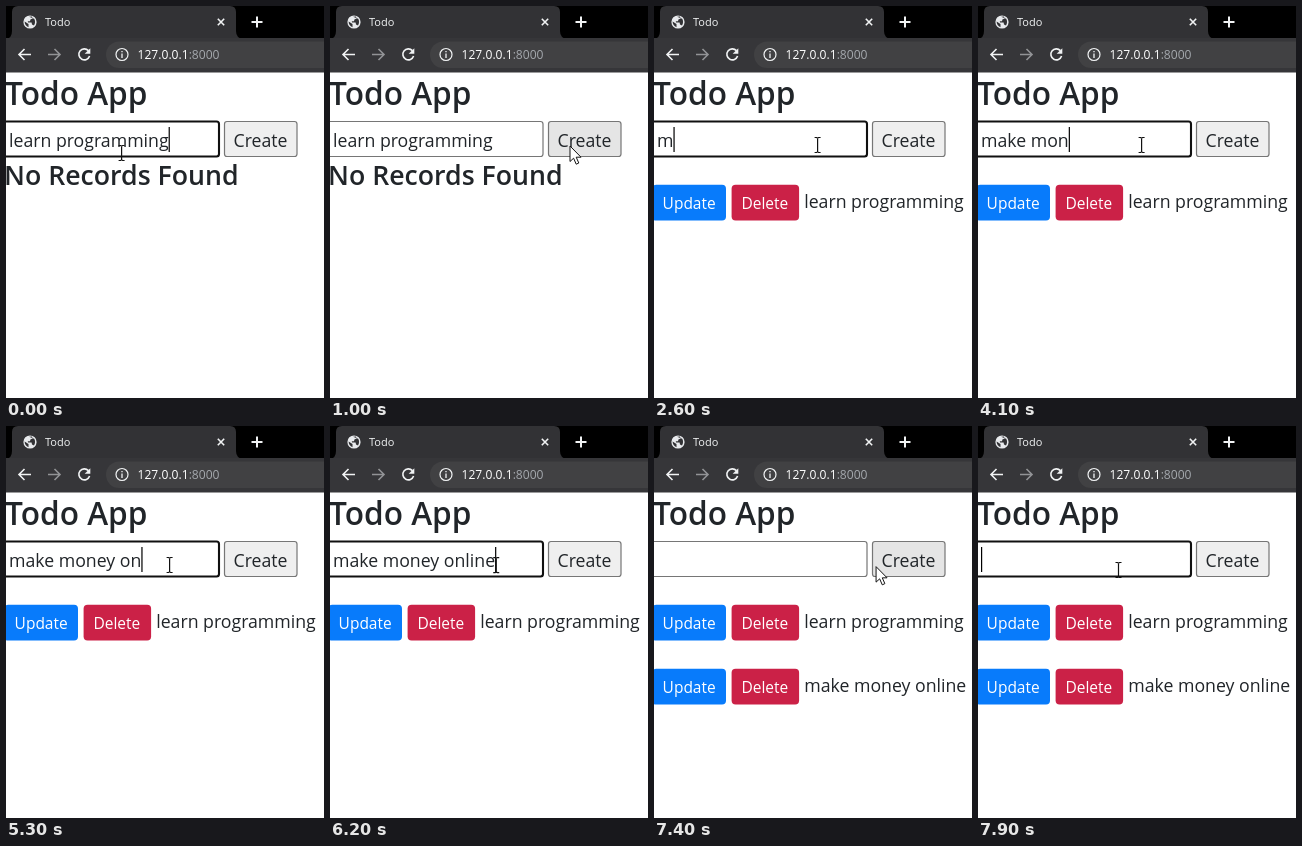
An HTML page for the animation above (8 s loop, 318 by 392 pixels).

```html
<!DOCTYPE html>
<html lang="en">
<head>
<meta charset="utf-8">
<title>Todo</title>
<style>
  html, body { margin: 0; width: 100%; height: 100%; overflow: hidden; background: #fff; }
  svg { display: block; width: 318px; height: 392px; }
  text { font: 17.7px "Open Sans", "Noto Sans", sans-serif; fill: #212529; white-space: pre; }
  .head { font-weight: 600; }
  .label { font-size: 15.5px; fill: #fff; }
  .icon { fill: none; stroke: #f1f3f4; stroke-width: 1.6; }
</style>
</head>
<body>
<svg viewBox="0 0 318 392">
  <defs>
    <g id="buttons">
      <rect x="-2" y="178.8" width="74" height="35.7" rx="4" fill="#087bfb"/>
      <rect x="77.6" y="178.8" width="67.5" height="35.7" rx="4" fill="#cb2147"/>
      <text class="label" x="8.6" y="203">Update</text>
      <text class="label" x="87.4" y="203">Delete</text>
    </g>
  </defs>

  <!-- browser frame -->
  <rect width="318" height="33"/>
  <path d="M0 33Q6 32 6 25V6Q6 0 12 0H224Q230 0 230 6V25Q230 32 237 33Z" fill="#323235"/>
  <rect y="32" width="318" height="34.5" fill="#363639"/>
  <rect x="100" y="35.5" width="240" height="26.5" rx="13.2" fill="#414143"/>
  <circle cx="24" cy="16" r="6.6" fill="#e8eaed"/>
  <path d="M18.6 15.5L22.5 18V21.3Q18.8 19.8 18.6 15.5ZM23 10.8L26 10.6L26.6 12.6L24.4 13.4L24 15.2H21.8L22 16.6H25.6L26 18.6L28 19.4Q30 16 28.2 12.8" fill="#323235"/>
  <text x="39" y="20" style="font-size:11px;font-weight:500;fill:#f1f3f4">Todo</text>
  <path class="icon" d="M211.8 12.8L218.2 19.2M218.2 12.8L211.8 19.2"/>
  <path class="icon" style="stroke-width:2" d="M251 10.5V21.5M245.5 16H256.5"/>
  <path class="icon" d="M25 48.5H13M18.5 43L13 48.5L18.5 54"/>
  <path class="icon" style="stroke:#929396" d="M42 48.5H54M48.5 43L54 48.5L48.5 54"/>
  <path class="icon" d="M82.4 44.6A5.5 5.5 0 1 0 83.6 50"/>
  <path d="M84.3 42.2V47.8H78.7Z" fill="#f1f3f4"/>
  <circle class="icon" cx="116" cy="48.5" r="6" style="stroke-width:1.2"/>
  <path class="icon" style="stroke-width:1.3" d="M116 47.5V52M116 45V46.3"/>
  <text x="131.5" y="53" style="font-size:12.1px;font-weight:500;fill:#fff">127.0.0.1<tspan fill="#a4a8ad" font-weight="400">:8000</tspan></text>

  <!-- page -->
  <text class="head" x="-1" y="99" style="font-size:31.6px">Todo App</text>
  <rect id="field" x="-4" y="115.5" height="35" width="217" rx="2.5" fill="#fff"/>
  <text id="entry" x="3" y="140.6"></text>
  <rect id="caret" y="121" width="1.2" height="25"/>
  <rect id="create" x="218.5" y="115.5" width="72.5" height="35" rx="2.5" stroke="#767676" stroke-width="1.2"/>
  <text x="227.5" y="140.5">Create</text>
  <text id="empty" class="head" x="-2" y="179" style="font-size:26.7px">No Records Found</text>
  <g id="row1"><use href="#buttons"/><text x="150.2" y="202">learn programming</text></g>
  <g id="row2"><use href="#buttons" y="64"/><text x="150.2" y="265.5">make money online</text></g>

  <!-- pointers -->
  <path id="beam" d="M-3 -7.5H-1L0 -6.8L1 -7.5H3M0 -6.8V6.8M-3 7.5H-1L0 6.8L1 7.5H3" fill="none" stroke="#111" stroke-width="1.2"/>
  <path id="arrow" d="M0 0V15.5L3.6 12.2L6.2 18.2L8.8 17L6.2 11.2H11Z" fill="#fff" stroke="#111" stroke-width="1"/>
</svg>
<script>
const LOOP = 8000;
const $ = id => document.getElementById(id);
const set = (id, attrs) => { for (const k in attrs) $(id).setAttribute(k, attrs[k]); };
const show = (id, on) => set(id, { visibility: on ? "visible" : "hidden" });
const within = (t, a, b) => t >= a && t < b;

// pointer stops: time, x, y
const path = [
  [0, 115.6, 147], [100, 115.6, 147], [650, 240, 140], [1050, 240, 140], [1450, 163.6, 139],
  [6150, 163.6, 139], [6600, 237.5, 140], [7300, 237.5, 140], [7700, 140.5, 144], [LOOP, 140.5, 144]
];
const keys = [2500, 2800, 3050, 3250, 3450, 3650, 3850, 4050, 4300,
              4550, 4750, 4950, 5200, 5450, 5650, 5800, 5950];

function pointer(t) {
  const i = path.findIndex(p => p[0] > t);
  const [a, b] = [path[i - 1], path[i]];
  const u = (t - a[0]) / (b[0] - a[0]), e = u * u * (3 - 2 * u);
  return [a[1] + (b[1] - a[1]) * e, a[2] + (b[2] - a[2]) * e];
}

function typed(t) {
  if (t < 1100) return "learn programming";
  if (t >= 7300) return "";
  return "make money online".slice(0, keys.filter(k => k <= t).length);
}

function draw(t) {
  const [x, y] = pointer(t);
  const text = typed(t);
  const pressed = within(t, 750, 900) || within(t, 6700, 6900);
  const focused = t < 750 || within(t, 2100, 6700) || t >= 7800;

  $("entry").textContent = text;
  set("field", focused
    ? { stroke: "#101010", "stroke-width": 2.1 }
    : { stroke: "#767676", "stroke-width": 1.2 });
  set("caret", { x: 3 + (text ? $("entry").getComputedTextLength() : 0) });
  show("caret", focused);
  set("create", { fill: pressed ? "#f5f5f5" : x > 218 ? "#e5e5e5" : "#efefef" });
  show("empty", t < 1100);
  show("row1", t >= 1100);
  show("row2", t >= 7300);

  const place = { transform: `translate(${x} ${y})` };
  set("beam", place);
  set("arrow", place);
  show("arrow", x > 214);
  show("beam", x <= 214);
}

const start = performance.now();
function tick() {
  draw((performance.now() - start) % LOOP);
  requestAnimationFrame(tick);
}
tick();
</script>
</body>
</html>
```
